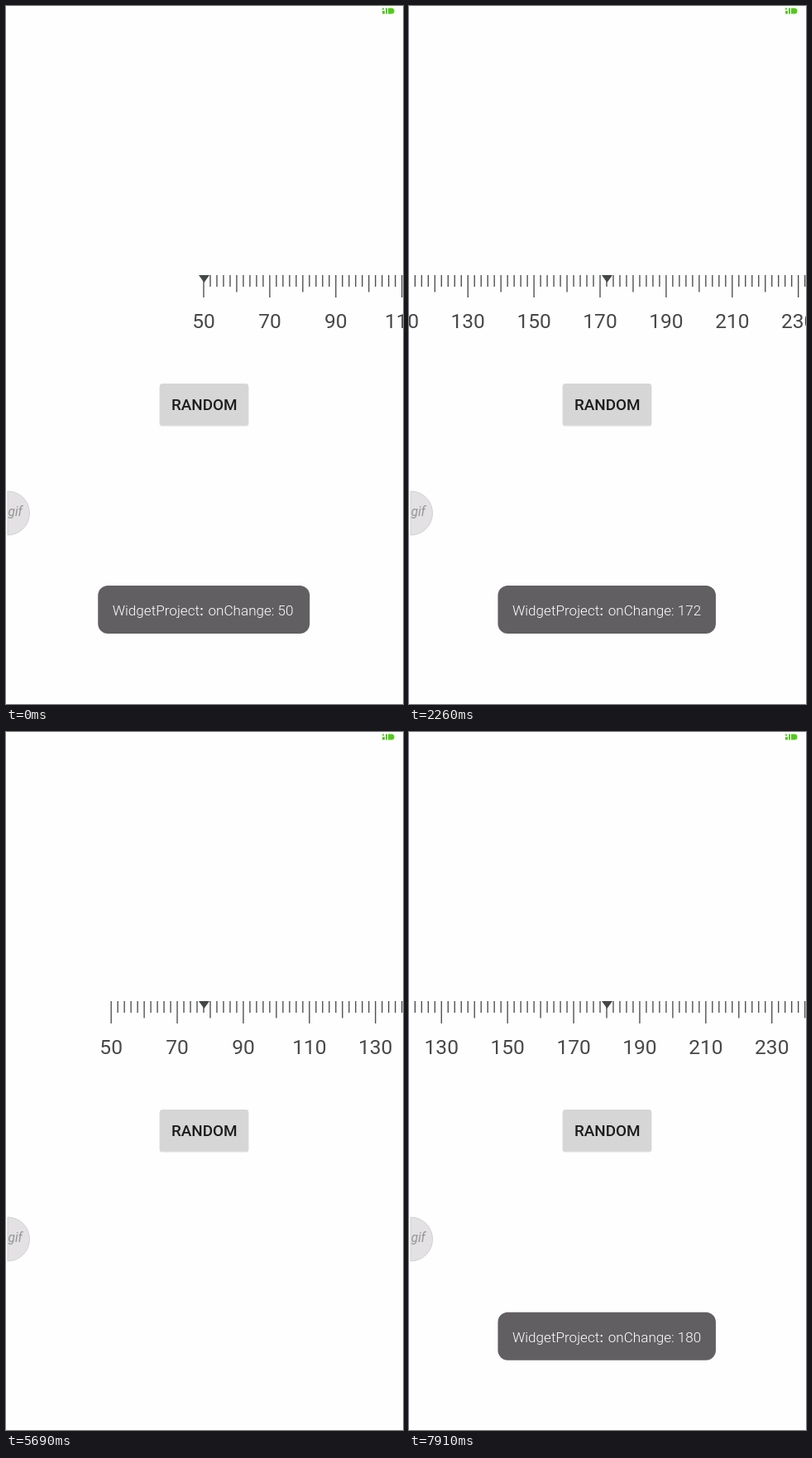
Recreate the animation shown at these times as an HTML page. Size 480 by 843 pixels, loop 8000 ms.

```html
<!DOCTYPE html>
<html lang="en">
<head>
<meta charset="utf-8">
<title>Ruler view</title>
<style>
  html, body { margin: 0; width: 100%; height: 100%; overflow: hidden; background: #fefefe; }
  svg { display: block; width: 100%; height: 100%; font-family: Roboto, sans-serif; }
  .label { font-size: 24.5px; fill: #484848; text-anchor: middle; }
  .button { font-size: 18.9px; font-weight: 500; fill: #1c1c1c; text-anchor: middle; }
  .toast { font-size: 17.1px; font-weight: 300; fill: #fff; }
  .colon { font-weight: 500; }
  .badge { font-size: 15.5px; font-style: italic; fill: #959595; }
</style>
</head>
<body>
<svg viewBox="0 0 480 843">
  <g fill="#55c81e">
    <path d="M455 2.5h2v2h-2zM455 6h3v3.5h-3zM459 2.5h2v7h-2z"/>
    <path d="M462 2.5h4a3.5 3.5 0 0 1 0 7h-4z"/>
  </g>
  <g id="ruler">
    <path id="ticks" stroke="#444644" stroke-width="1.3"/>
  </g>
  <path d="M233 325h13l-6.5 9z" fill="#444845"/>
  <rect x="185.5" y="457" width="108" height="50.5" rx="3.5" fill="#c4c4c4" opacity=".55"/>
  <rect x="186" y="456" width="107" height="50" rx="3" fill="#d7d6d6"/>
  <text class="button" x="239.8" y="488">RANDOM</text>
  <path d="M2 586a26.5 26.5 0 0 1 0 53z" fill="#e3e1e3" stroke="#d2d0d2"/>
  <text class="badge" x="2.5" y="616">gif</text>
  <g id="toast">
    <rect id="box" height="58" rx="12" fill="#625f62"/>
    <text class="toast" x="17.5" y="36">WidgetProject</text>
    <text class="toast colon" x="123" y="36">:</text>
    <text class="toast" id="message" x="133.3" y="36"></text>
  </g>
</svg>
<script>
const LOOP = 8000, CENTER = 239, UNIT = 3.995, MIN = 50, MAX = 250;
const $ = id => document.getElementById(id);

const easeOut = u => 1 - (1 - u) ** 2;
const easeInOut = u => (1 - Math.cos(Math.PI * u)) / 2;

// The ruler moves to a value; its toast is shown and hidden later
const moves = [
  { start: -2000, time: 1090, to: 50, ease: easeOut, show: -1000, hide: 620 },
  { start: 350, time: 1090, to: 172, ease: easeOut, show: 1570, hide: 3150 },
  { start: 2880, time: 546, to: 212, ease: easeInOut, show: 3830, hide: 4206 },
  { start: 4270, time: 517, to: 78, ease: easeInOut, show: 5760, hide: 6570 },
  { start: 6304, time: 1090, to: 180, ease: easeOut, show: 7510, hide: LOOP }
];

const clamp = u => Math.min(1, Math.max(0, u));

function valueAt(t) {
  return moves.reduce((value, m) =>
    value + (m.to - value) * m.ease(clamp((t - m.start) / m.time)), MIN);
}

function buildRuler() {
  let d = "";
  for (let v = MIN; v <= MAX; v += 2) {
    const x = (v - MIN) * UNIT, major = (v - MIN) % 20 === 0;
    d += `M${x.toFixed(2)} 325v${major ? 27 : v % 10 ? 14 : 20.5}`;
    if (!major) continue;
    const label = document.createElementNS("http://www.w3.org/2000/svg", "text");
    label.setAttribute("class", "label");
    label.setAttribute("x", x);
    label.setAttribute("y", 389);
    label.textContent = v;
    $("ruler").append(label);
  }
  $("ticks").setAttribute("d", d);
}

function drawToast(t) {
  const { to, show, hide } = moves.filter(m => m.show <= t).pop();
  const age = t - show;
  const bounce = 41 * Math.exp(-age / 110) * Math.cos(Math.PI * age / 180);
  const opacity = clamp(.2 + age / 120) * clamp(1 - (t - hide) / 270);
  const width = 241 + 7.5 * String(to).length;
  $("toast").setAttribute("opacity", opacity);
  $("toast").setAttribute("transform",
    `translate(${CENTER + .2 - width / 2} ${(700 + bounce).toFixed(2)})`);
  $("box").setAttribute("width", width);
  $("message").textContent = "onChange: " + to;
}

function draw(t) {
  const x = CENTER - (valueAt(t) - MIN) * UNIT;
  $("ruler").setAttribute("transform", `translate(${x.toFixed(2)} 0)`);
  drawToast(t);
}

buildRuler();
const begin = performance.now();
function tick() {
  draw((performance.now() - begin) % LOOP);
  requestAnimationFrame(tick);
}
tick();
</script>
</body>
</html>
```
